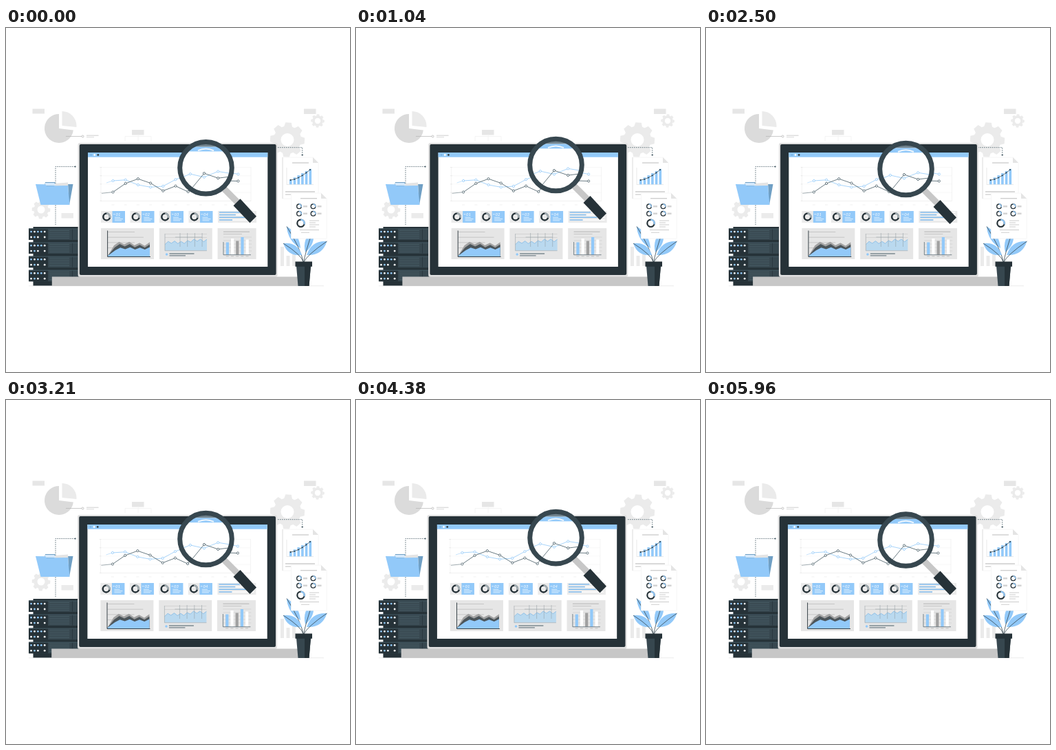
An HTML page with a canvas for the animation above (6000 ms loop, 500 px wide and 500 px high).

```html
<!DOCTYPE html>
<html lang="en">
<head>
<meta charset="utf-8">
<title>Data analysis</title>
<style>
html, body { margin: 0; width: 100%; height: 100%; overflow: hidden; background: #fff; }
canvas { display: block; width: 500px; height: 500px; }
</style>
</head>
<body>
<canvas id="stage" width="500" height="500"></canvas>
<script>
const ctx = document.getElementById('stage').getContext('2d');
const BLUE = '#92c9f9', DARK = '#263238', SLATE = '#37474f', MID = '#455a64';
const PALE = '#ebebeb', SOFT = '#e6e6e6', GREY = '#c7c7c7', FAINT = '#f4f4f4';
const LOOP = 6000, TAU = Math.PI * 2;

// Drawing helpers
function repeat(n, draw) {
  for (let i = 0; i < n; i++) draw(i);
}
function rect(x, y, w, h, color) {
  ctx.fillStyle = color;
  ctx.fillRect(x, y, w, h);
}
function rounded(x, y, w, h, r, color) {
  ctx.fillStyle = color;
  ctx.beginPath();
  ctx.roundRect(x, y, w, h, r);
  ctx.fill();
}
function trace(pts) {
  ctx.beginPath();
  for (let i = 0; i < pts.length; i += 2) ctx.lineTo(pts[i], pts[i + 1]);
}
function poly(color, ...pts) {
  trace(pts);
  ctx.fillStyle = color;
  ctx.fill();
}
function line(color, width, ...pts) {
  trace(pts);
  ctx.strokeStyle = color;
  ctx.lineWidth = width;
  ctx.stroke();
}
function row(x, y, w, color, width = 0.9) {
  line(color, width, x, y, x + w, y);
}
function disc(x, y, r, color, from = 0, to = TAU) {
  ctx.fillStyle = color;
  ctx.beginPath();
  if (to - from < TAU) ctx.moveTo(x, y);
  ctx.arc(x, y, r, from, to);
  ctx.fill();
}
function ring(x, y, r, width, color, from = 0, to = TAU) {
  ctx.strokeStyle = color;
  ctx.lineWidth = width;
  ctx.beginPath();
  ctx.arc(x, y, r, from, to);
  ctx.stroke();
}
function dashedArrow(dx, dy, ...pts) {
  const [x, y] = pts.slice(-2);
  ctx.setLineDash([1.6, 1.4]);
  line(MID, 0.8, ...pts);
  ctx.setLineDash([]);
  poly(MID, x + dx * 2, y + dy * 2, x - dy * 1.6, y + dx * 1.6, x + dy * 1.6, y - dx * 1.6);
}
function shifted(x, y, draw, angle = 0) {
  ctx.save();
  ctx.translate(x, y);
  ctx.rotate(angle);
  draw();
  ctx.restore();
}
function gear(x, y, r, hole) {
  const body = r * 0.8;
  ring(x, y, (body + hole) / 2, body - hole, PALE);
  repeat(8, i => shifted(x, y, () =>
    poly(PALE, -r * 0.24, -body * 0.95, -r * 0.17, -r, r * 0.17, -r, r * 0.24, -body * 0.95),
    i * TAU / 8 + 0.06));
}
function leaf(x, y, baseX, baseY, bulge) {
  const mx = (x + baseX) / 2, my = (y + baseY) / 2;
  const len = Math.hypot(x - baseX, y - baseY);
  const nx = (baseY - y) / len * bulge, ny = (x - baseX) / len * bulge;
  ctx.fillStyle = BLUE;
  ctx.beginPath();
  ctx.moveTo(x, y);
  ctx.quadraticCurveTo(mx + nx, my + ny, baseX, baseY);
  ctx.quadraticCurveTo(mx - nx, my - ny, x, y);
  ctx.fill();
  ctx.strokeStyle = SLATE;
  ctx.lineWidth = 0.8;
  ctx.beginPath();
  ctx.moveTo(x, y);
  ctx.quadraticCurveTo(baseX, baseY, 432.5, 341);
  ctx.stroke();
}
function donut(x, y, r, width, rest) {
  ring(x, y, r, width, DARK);
  ring(x, y, r, width, rest, -1.6, 0.3);
}
// Evenly spaced markers joined by a line
function series(color, x, step, ys) {
  const pts = ys.flatMap((y, i) => [x + i * step, y]);
  line(color, 0.8, ...pts);
  repeat(ys.length, i => {
    disc(x + i * step, ys[i], 1.6, '#fff');
    ring(x + i * step, ys[i], 1.6, 0.8, color);
  });
}
// Jagged skyline between x0 and x1 that climbs by rise
function ridge(x0, x1, n, y, amp, rise) {
  const pts = [];
  for (let i = 0; i <= n; i++) {
    const jag = (i % 2 ? -amp : amp) * (0.7 + 0.4 * Math.sin(i * 2.3));
    pts.push(x0 + (x1 - x0) * i / n, y + jag - rise * i / n);
  }
  return pts;
}

function backdrop() {
  rect(38.5, 117.5, 17.5, 7, SOFT);
  rect(433, 117.5, 17.5, 7.5, SOFT);
  rect(183, 148, 17.5, 7.5, SOFT);
  rect(80.5, 269, 17.5, 7.5, PALE);

  disc(77, 146, 21, '#dbdbdb', 0.12, TAU * 0.75);
  disc(81.5, 142, 21, PALE, -TAU / 4, 0.1);
  row(87, 157.5, 23, '#b5b5b5', 0.7);
  ring(111.5, 157.5, 1.5, 0.8, '#b5b5b5');
  row(117, 156.2, 17.5, GREY);
  row(117, 158.6, 11, '#d5d5d5');
  line(FAINT, 1, 192, 155, 192, 164);
  line(FAINT, 1, 173, 164.5, 173, 157.5, 211, 157.5, 211, 164.5);

  gear(409, 162.5, 25, 9.5);
  gear(453, 135, 9.7, 4.2);
  gear(51, 264, 13.3, 5.5);
  repeat(3, i => rect(399 + i * 8.5, 318 + i % 2 * 13, 5, 28 - i % 2 * 13, PALE));
  row(33, 374.8, 429, '#dedede', 0.6);
}

function folder() {
  dashedArrow(1, 0, 72, 286, 72, 201.5, 100, 201.5);
  poly('#6f9fc4', 57, 224, 71, 224, 73, 227, 97.5, 227, 92, 257, 51, 257);
  poly('#e4e4e4', 70, 226, 90, 224.5, 91, 240, 71, 240);
  poly('#d3e8fb', 57, 225, 70, 225, 72, 229, 57, 229);
  poly(BLUE, 43, 227, 57, 227.3, 59, 229.5, 90, 229, 92.5, 257, 50.5, 257);
}

function servers() {
  rect(39.5, 289, 68, 85.5, DARK);
  repeat(4, i => {
    const y = 291.5 + i * 20.1;
    rounded(33, y, 75, 16.5, 1, SLATE);
    rect(33, y, 28, 16.5, DARK);
    row(33, y + 0.5, 75, MID);
    repeat(5, j => {
      disc(36.6 + j * 4.9, y + 4.6, 1.4, j % 3 === 1 ? '#fff' : BLUE);
      if (j !== 3) disc(36.6 + j * 4.9, y + 12.5, 1.4, j % 2 ? BLUE : '#fff');
      row(63, y + 3 + j * 2.7, 29, '#536a75', 0.6);
    });
    rect(96, y + 1, 0.7, 15, DARK);
  });
}

function sheet(x, y, w, h) {
  const fold = 8, edge = [x, y, x + w - fold, y, x + w, y + fold, x + w, y + h, x, y + h];
  poly('#fff', ...edge);
  line(FAINT, 0.8, ...edge, x, y);
  poly('#e4e4e4', x + w - fold, y, x + w - fold, y + fold, x + w, y + fold);
}

function barSheet() {
  dashedArrow(0, 1, 395, 173.7, 430.7, 173.7, 430.7, 184);
  sheet(402, 188, 52, 60);
  line('#dedede', 1, 402, 188, 402, 248);
  row(416, 196, 24, '#cfcfcf', 1.4);
  line('#d8d8d8', 0.6, 408, 203, 408, 227.6, 447, 227.6);
  const trend = [];
  repeat(6, i => {
    const x = 412 + i * 5.7, h = 7 + i * 3.1;
    rect(x, 227.3 - h, 3.6, h, BLUE);
    trend.push(x + 1.5, 221 - 15 * (i / 5) ** 1.6);
  });
  line(MID, 0.8, ...trend);
  repeat(6, i => disc(trend[i * 2], trend[i * 2 + 1], 0.9, DARK));
  row(406, 238, 43, '#ccc', 1.3);
  row(406, 242, 8, '#ccc', 1.2);
}

function report() {
  sheet(414.5, 240, 51.5, 66);
  row(428, 247.7, 24, '#ccc', 1.3);
  repeat(4, i => {
    const x = 426 + i % 2 * 20.5, y = i < 2 ? 259.3 : 269.8;
    donut(x, y, 3.3, 1.4, BLUE);
    rect(x + 6, y - 1.3, 6, 2.5, '#d4d4d4');
  });
  donut(428.5, 283.8, 5.2, 2.2, BLUE);
  repeat(4, i => row(441, 280 + i * 3, i % 2 ? 9 : 14, GREY));
  row(427, 293.5, 28, GREY);
  row(429, 297.2, 12, GREY);
}

function plant() {
  leaf(408, 288.5, 428, 320, 10);
  leaf(403, 313, 430, 330, 13);
  leaf(446, 294, 435, 326, 11);
  leaf(466.5, 310, 437, 330, 14);
}

function pot() {
  poly(SLATE, 422, 346, 443, 346, 440.5, 375, 424.5, 375);
  poly(DARK, 434, 346, 443, 346, 440.5, 375, 434, 375);
  rect(420.5, 339.5, 24.5, 7.3, DARK);
}

function mainChart() {
  const x = 155.5, step = 18.2;
  repeat(5, i => {
    row(138, 202.5 + i * 12.2, 218, FAINT, 0.6);
    row(136.5, 202.5 + i * 12.2, 2.5, '#d8d8d8', 0.6);
  });
  repeat(11, i => row(x + i * step - 2, 257, 4, PALE, 0.7));
  line(PALE, 0.6, 138, 202, 138, 251.5, 356, 251.5, 356, 202);
  line(MID, 0.5, 139, 240.3, x, 238.5);
  line(BLUE, 0.5, 146, 225, x, 222);
  series(BLUE, x, step, [222, 220.8, 228, 231.3, 230, 220.2, 213, 217, 209, 209, 212.5]);
  series(MID, x, step, [238.5, 226, 219.2, 225.5, 236.7, 229.7, 238, 214, 218, 222, 222.5]);
}

function cards() {
  repeat(4, i => {
    const x = 138 + i * 42.5;
    rect(x, 266, 17, 17, PALE);
    rect(x + 16.5, 266, 18.5, 17, BLUE);
    donut(x + 8.2, 274.5, 4.9, 2.5, '#a5b0b5');
    ctx.fillStyle = '#fff';
    ctx.font = 'italic 6px Lato, "Open Sans", sans-serif';
    ctx.fillText('0' + (i + 1), x + 21.5, 273);
    row(x + 18, 270.7, 2.6, '#fff', 0.7);
    repeat(3, j => row(x + 20, 275.3 + j * 2.3, j ? 14 - j * 2 : 8, '#fff', 0.7));
  });
  rect(308, 266, 56, 17, PALE);
  repeat(4, i => {
    row(310, 267.9 + i * 3.7, 51, '#fff', 1.6);
    row(310, 267.9 + i * 3.7, 30 + 11 * Math.sin(i * 2.6 + 3.1), '#7fb9ea', 1.5);
  });
}

function areaPanel() {
  repeat(4, i => row(148, 296.5 + i * 7.7, i % 2 ? 52 : 39, '#b0b0b0', 0.6));
  [['#a3a3a3', 314, 3, 1], ['#4c555a', 317, 2.8, 1], [BLUE, 321.5, 2, 2]].forEach(([color, y, amp, rise], i) =>
    poly(color, 148, 331, ...ridge(157 + i, 209, 7, y, amp, rise), 209, 332, 148, 332));
  line(DARK, 0.9, 147.6, 294.5, 147.6, 332.5, 210, 332.5);
}

function skylinePanel() {
  const top = ridge(231, 292, 13, 313, 2.4, 5);
  repeat(2, i => row(231, 299.5 + i * 5, 61, GREY, 0.6));
  poly('#bad9ef', ...top, 292, 323.5, 231, 323.5);
  line('#78b5e6', 0.7, ...top);
  repeat(4, i => line('#8d999f', 0.5, 253 + i * 10.7, 298, 253 + i * 10.7, 318));
  row(246, 304, 39, '#8d999f', 0.5);
  line('#9aa5aa', 0.6, 231, 299, 231, 323.7, 292, 323.7);
  disc(233.6, 329, 1.8, BLUE);
  row(237.5, 328, 36, MID, 1);
  row(237.5, 330.9, 23.5, MID);
}

function barPanel() {
  row(316, 296.2, 38, '#9e9e9e', 0.7);
  row(316, 299.5, 27, '#b0b0b0', 0.6);
  repeat(5, i => row(316, 304 + i * 5, 41, '#c4c4c4', 0.5));
  [BLUE, '#fff', '#a0a0a0', BLUE, '#fff'].forEach((color, i) => {
    const x = 319.8 + i * 7.2, top = 309.5 - i + (i % 2 ? -2.5 : 2);
    rect(x, top, 4.2, 329.5 - top, color);
    row(x, 331.8, 4, '#b0b0b0', 0.7);
  });
  line(MID, 0.7, 316, 311, 316, 329.7, 356, 329.7);
}

function laptop() {
  rounded(104.6, 167, 290, 195, 3, '#e0e0e0');
  rounded(106.8, 169, 285.8, 190, 2, DARK);
  rect(119, 181, 261.3, 166, '#fff');
  rect(119, 181, 261.3, 6.7, BLUE);
  ['#7db7e8', '#fff', SLATE].forEach((color, i) => disc(123.6 + i * 5.1, 184.5, 1.4, color));
  mainChart();
  cards();
  repeat(3, i => rect(138 + i * 84.8, 291, i < 2 ? 77 : 56, 45, SOFT));
  areaPanel();
  skylinePanel();
  barPanel();
  rect(66.8, 361.5, 366.2, 13.5, GREY);
}

function magnifier() {
  const x = 290.5, y = 203;
  poly(GREY, 314, 237, 320.5, 230.5, 340, 250, 333.5, 256.5);
  poly(DARK, 330.5, 258, 340.5, 248, 364, 273.5, 354.5, 283);

  ctx.save();
  ctx.beginPath();
  ctx.arc(x, y, 36, 0, TAU);
  ctx.clip();
  rect(250, 160, 82, 90, '#fff');
  rect(250, 160, 82, 12.5, '#71838d');
  rect(250, 172.5, 82, 6.7, BLUE);
  series(BLUE, 247.6, 20.2, [220, 212, 216.5, 208.3, 211.5]);
  series(MID, 247.6, 20.2, [231, 235.5, 211, 218, 215.5]);
  ring(x, y, 27.5, 2, 'rgba(255,255,255,.85)', -2, -1.14);
  ctx.restore();

  ring(x, y, 37.8, 7, SLATE);
}

// Sideways shake: stops at every tenth of the loop, mirrored about the middle
function shakeAt(t) {
  const stops = [0, -0.5, 1, -2, 2, -2];
  const p = 5 - Math.abs(t / LOOP * 10 - 5);
  const i = Math.min(4, Math.floor(p));
  return stops[i] + (stops[i + 1] - stops[i]) * (p - i);
}
function floatAt(t) {
  return -1 - 3 * Math.cos(TAU * (t - 950) / 3000);
}

function frame() {
  const t = performance.now() % LOOP;
  rect(0, 0, 500, 500, '#fff');
  backdrop();
  folder();
  servers();
  barSheet();
  plant();
  report();
  shifted(shakeAt(t), 0, laptop);
  pot();
  shifted(0, floatAt(t), magnifier);
  requestAnimationFrame(frame);
}
frame();
</script>
</body>
</html>
```
